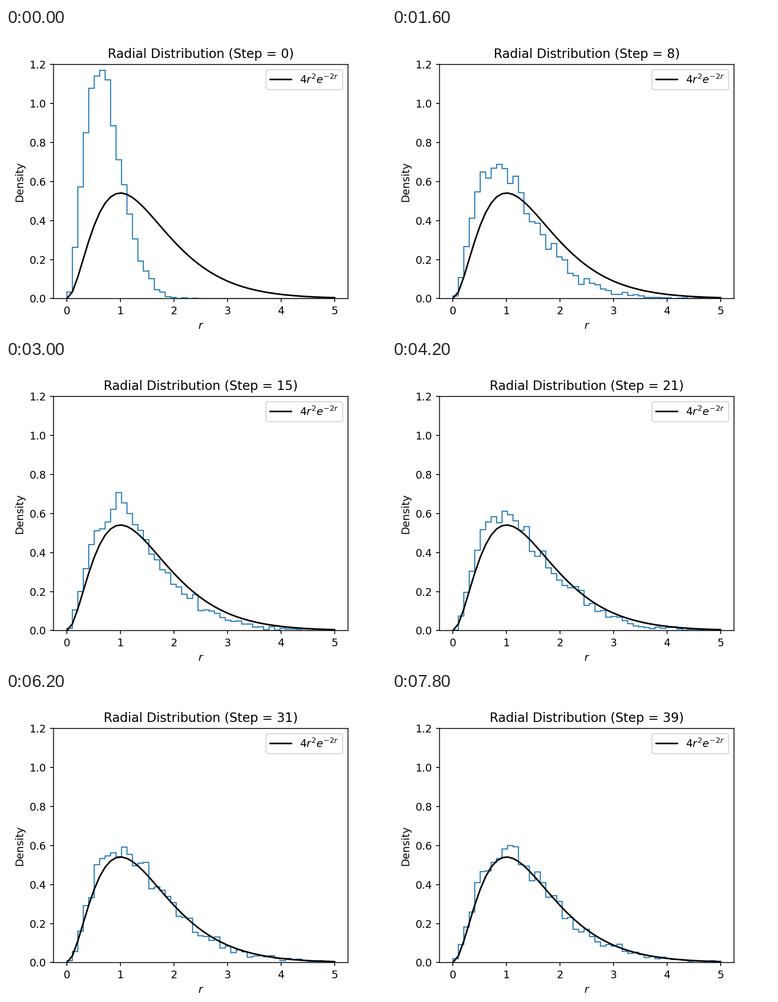
Recreate the animation shown at these times as a matplotlib script. Size 837 by 669 pixels, loop 8000 ms.

```python
import numpy as np
import matplotlib.pyplot as plt
from matplotlib.animation import FuncAnimation

plt.rcParams["path.snap"] = False

W, H, DPI = 837, 669, 167.4
STEPS, INTERVAL = 40, 200
WALKERS = 5000
EDGES = np.linspace(0, 5, 50)
MID = (EDGES[1:] + EDGES[:-1]) / 2
WIDTH = EDGES[1] - EDGES[0]
UNIT = 1 / (WALKERS * WIDTH)  # density of a single walker in a bin


def radial(r):
    return 4 * r**2 * np.exp(-2 * r)


def spread(step):
    """Mean density: a narrow cloud that relaxes to the radial curve."""
    rate = 2 + 0.95 * np.exp(-step / 12.5)
    power = 1 + 0.5 * np.exp(-step / 2.2)
    p = MID**2 * np.exp(-rate * MID**power)
    return p / (p.sum() * WIDTH)


def make_noise(rho=0.6):
    """Unit noise per step and bin, correlated in time."""
    rng = np.random.default_rng(7)
    z = rng.standard_normal((STEPS, len(MID)))
    for i in range(1, STEPS):
        z[i] = rho * z[i - 1] + np.sqrt(1 - rho**2) * z[i]
    return z


NOISE = make_noise()


def density(step):
    """Mean plus counting noise, rounded to whole walkers."""
    mean = spread(step)
    value = mean + NOISE[step] * np.sqrt(mean * UNIT)
    return np.maximum(np.round(value / UNIT), 0) * UNIT


fig, ax = plt.subplots(figsize=((W + 1e-6) / DPI, (H + 1e-6) / DPI), dpi=DPI)
ax.plot(EDGES, radial(EDGES), "k", label="$4r^2e^{-2r}$")
hist = ax.stairs(density(0), EDGES, color="C0", lw=1)
ax.set(xlim=(-0.25, 5.25), ylim=(0, 1.2), xlabel="$r$", ylabel="Density")
ax.legend(loc="upper right")
title = ax.set_title("Radial Distribution (Step = 0)")


def update(step):
    hist.set_data(values=density(step))
    title.set_text(f"Radial Distribution (Step = {step})")
    return hist, title


anim = FuncAnimation(fig, update, frames=STEPS, interval=INTERVAL,
                     repeat=True, repeat_delay=0)
plt.show()
```
